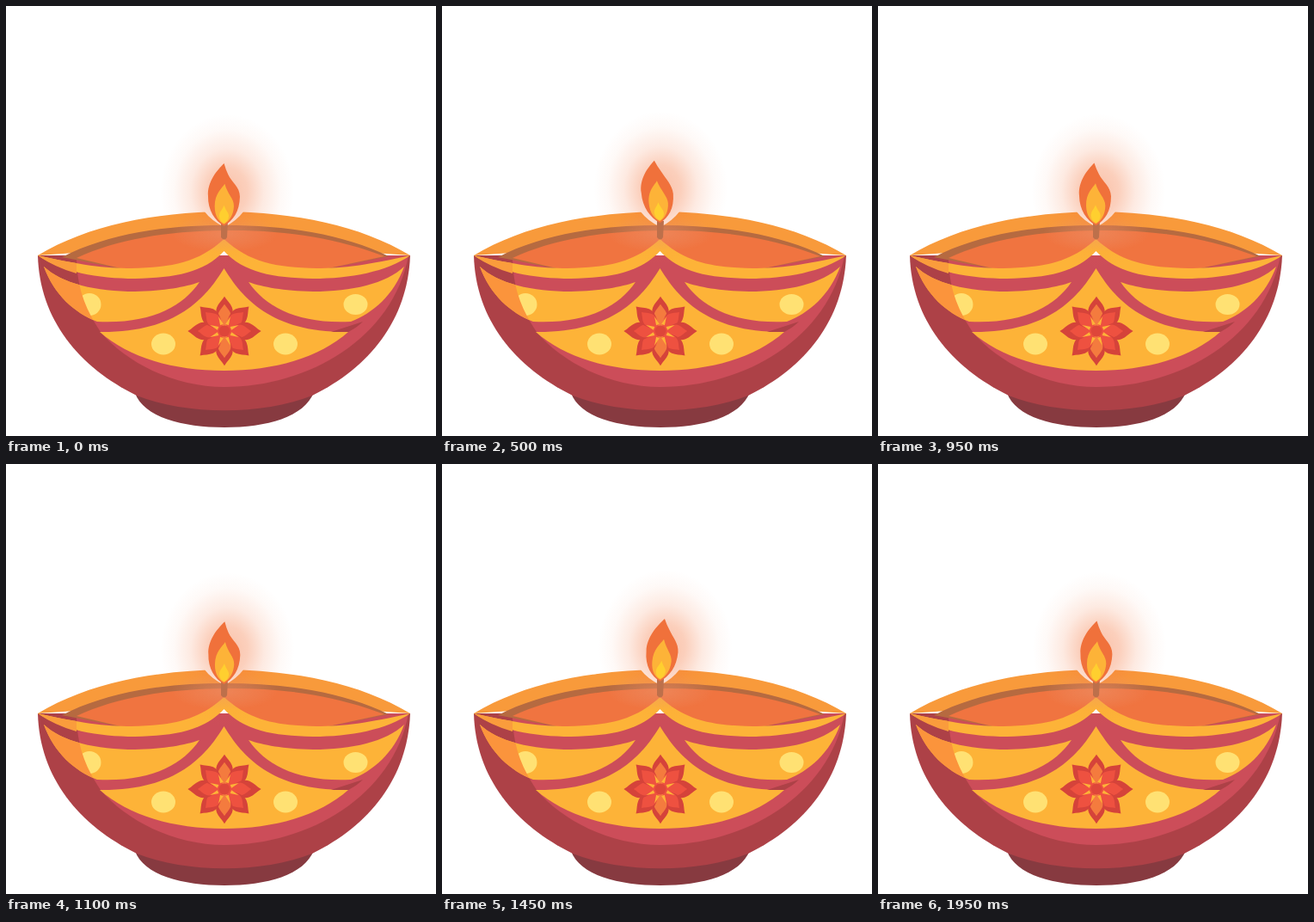
Recreate the animation shown at these times as an HTML page. Size 500 by 500 pixels, loop 2 s.

```html
<!DOCTYPE html>
<html lang="en">
<head>
<meta charset="utf-8">
<title>Oil lamp</title>
<style>
  html, body { margin: 0; width: 100%; height: 100%; overflow: hidden; background: #fff; }
  svg { display: block; width: 100vw; height: 100vh; }
</style>
</head>
<body>
<svg viewBox="0 0 500 500">
  <defs>
    <radialGradient id="halo">
      <stop offset="0" stop-color="#f4733a" stop-opacity=".44"/>
      <stop offset=".3" stop-color="#f4733a" stop-opacity=".34"/>
      <stop offset=".55" stop-color="#f4733a" stop-opacity=".15"/>
      <stop offset=".8" stop-color="#f4733a" stop-opacity=".04"/>
      <stop offset="1" stop-color="#f4733a" stop-opacity="0"/>
    </radialGradient>
    <radialGradient id="sheen">
      <stop offset="0" stop-color="#e8a080" stop-opacity=".45"/>
      <stop offset="1" stop-color="#e8a080" stop-opacity="0"/>
    </radialGradient>
    <path id="side" d="M44 303C65 323 105 332 150 332C185 331 208 327 225 321C205 350 168 370 106 367C80 357 56 336 44 303Z"/>
    <path id="middle" d="M253.500 305C232 340 198 380 109 379C143 409 195 424 253.500 424C312 424 364 409 398 379C309 380 275 340 253.500 305Z"/>
    <path id="petal" d="M0 -4C-7 -11 -12 -21 -9 -28C-7 -33 -3 -36 0 -41C3 -36 7 -33 9 -28C12 -21 7 -11 0 -4Z"/>
    <clipPath id="panels">
      <use href="#side"/>
      <use href="#middle"/>
    </clipPath>
    <clipPath id="bowl">
      <path id="body" d="M37 290C39 365 85 420 152 453C210 476 298 476 356 453C423 420 467 365 470 290Z"/>
    </clipPath>
  </defs>

  <!-- Bowl -->
  <path d="M150 450C160 478 205 490 254 490C303 490 347 478 358 449Z" fill="#873a40"/>
  <use href="#body" fill="#ad4147"/>
  <path clip-path="url(#bowl)" fill="#cc4d59"
    d="M82 290C82 325 91 351 110 379C139 414 195 443 254 443C352 443 450 386 468 290Z"/>
  <g fill="#fdb338">
    <use href="#side"/>
    <use href="#side" transform="matrix(-1 0 0 1 507 0)"/>
    <use href="#middle"/>
  </g>
  <path d="M378 379L415 367C410 372 404 376 398 379Z" fill="#ad4147"/>
  <g fill="#ffe173">
    <ellipse cx="97" cy="347" rx="13.5" ry="13"/>
    <ellipse cx="406.500" cy="347" rx="14" ry="12"/>
    <ellipse cx="183" cy="393" rx="14" ry="12.500"/>
    <ellipse cx="325" cy="393" rx="14" ry="12.500"/>
  </g>
  <path clip-path="url(#panels)" fill="#fb943c"
    d="M30 290H82C82 325 91 351 110 379H30Z"/>

  <g id="flower" transform="translate(254 378)"></g>

  <!-- Rim and oil -->
  <path d="M37 290C95 255 172 240 254 239C336 240 412 255 470 290L254 275Z" fill="#f89a3b"/>
  <path d="M65 292C120 264 186 255 254 255C326 255 392 265 445 291L361 308C313 307 283 301 253.500 275C224 301 194 307 146 308Z" fill="#b66a40"/>
  <path d="M82 293C130 271 185 262 254 261C325 260 385 270 440 291L361 308C313 307 283 301 253.500 275C224 301 194 307 146 308Z" fill="#f07440"/>
  <path fill="#fdb338"
    d="M37 290C85 301 115 305 146 305C194 304 224 298 253.500 271C283 298 313 304 361 305C392 305 422 301 470 290C443 309 400 317 357 317C310 316 277 310 253.500 285C230 310 197 316 150 317C107 317 64 309 37 290Z"/>
  <path d="M37 290Q62 296 82 299V311Q57 304 37 290Z" fill="#fa9c3c"/>

  <!-- Light -->
  <ellipse cx="254" cy="264" rx="62" ry="22" fill="url(#sheen)"/>
  <path d="M230 238Q239 250 254 257Q268 250 277 238Z" fill="#fff"/>
  <ellipse id="glow" rx="78" ry="90" fill="url(#halo)"/>
  <path d="M250 250H258L257 269Q254 274 250 269Z" fill="#bd704b"/>
  <g id="flame">
    <path id="outer" fill="#f0713b"/>
    <path id="inner" fill="#fdb338"/>
    <path d="M253.500 230C251 236 247 238 248 244Q249 249 253.500 251Q258 249 259 243C259 238 255 236 253.500 230Z" fill="#ffcf2f"/>
  </g>
</svg>
<script>
  const LOOP = 2000, TAU = Math.PI * 2;
  const BASE = 254, HEIGHT = 72;
  const el = id => document.getElementById(id);

  const petal = (angle, fill, scale) =>
    `<use href="#petal" fill="${fill}" transform="rotate(${angle}) scale(${scale})"/>`;
  let parts = '';
  for (let i = 0; i < 8; i++) {
    parts += petal(i * 45, '#d5433a', i % 4 === 2 ? 1.04 : 0.98);
    parts += petal(i * 45, i % 4 ? '#ee5140' : '#f47b3e', 0.76);
  }
  for (let i = 0; i < 8; i++) {
    parts += `<path d="M0 -18L2 -8H-2Z" fill="#fdb338" transform="rotate(${i * 45 + 22.5})"/>`;
  }
  el('flower').innerHTML = parts + '<circle r="6.500" fill="#de463a"/>';

  // wave runs from 0 (smooth right edge) to 1 (hooked tip)
  function outline(wave) {
    return `M253 181.300C245 189 233.500 203 234.700 219C234.500 236 243 248 253.500 254
      C264 248 271.500 237 271.700 220C271.500 ${210 - wave * 2} ${265 - wave * 3} ${203 + wave} ${260 - wave * 2.5} 194
      Q${256 - wave} ${188 + wave} 253 181.300Z`;
  }

  function core(wave) {
    return `M254 205C251 210 242.500 216 242.500 231C242.500 243 248 249 253.500 252
      C260 248 264.500 241 264.800 231C265 ${223 - wave} ${258 - wave} 217 254 205Z`;
  }

  function draw(t) {
    const sway = -6.1 * Math.sin(TAU * (t - 30) / LOOP);
    const bob = Math.cos(TAU * (t - 100) / (LOOP / 2));
    const wave = (1 + bob) / 2;
    const lean = sway / HEIGHT;
    el('flame').setAttribute('transform',
      `matrix(1 0 ${-lean} 1 ${lean * BASE} ${bob * 2})`);
    el('outer').setAttribute('d', outline(wave));
    el('inner').setAttribute('d', core(wave));
    el('glow').setAttribute('cx', 257 + sway * 0.45);
    el('glow').setAttribute('cy', 214 + bob * 2);
  }

  const start = performance.now();
  function tick() {
    draw((performance.now() - start) % LOOP);
    requestAnimationFrame(tick);
  }
  draw(0);
  requestAnimationFrame(tick);
</script>
</body>
</html>
```
